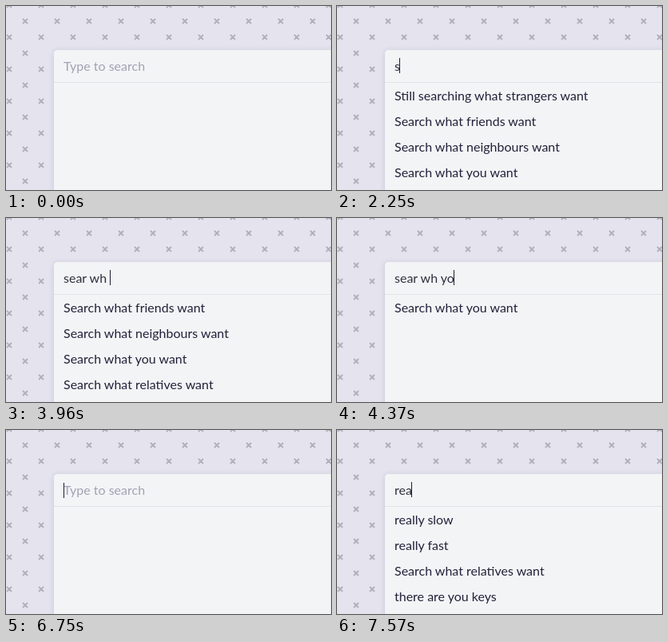
These frames come from a looping animation (407 by 230 pixels, 8000 ms). An HTML page:

```html
<!DOCTYPE html>
<html lang="en">
<head>
<meta charset="utf-8">
<title>Search box</title>
<style>
  html, body { margin: 0; width: 100%; height: 100%; overflow: hidden; }
  body { position: relative; background: #e5e3ee; font: 16px/19px Lato, sans-serif; color: #22223a; }
  svg { position: absolute; inset: 0; width: 100%; height: 100%; }
  .panel {
    position: absolute; left: 60px; top: 55px; right: -20px; bottom: -20px;
    background: #f3f4f6; border-radius: 4px 0 0 0;
    box-shadow: 0 1px 7px rgba(45, 40, 80, .15);
  }
  .rule { position: absolute; left: 0; right: 0; top: 40px; height: 1px; background: #e3e4ea; }
  .line { position: absolute; left: 12px; white-space: pre; }
  #field { top: 10px; color: #30303f; }
  #field.hint { color: #a2a2b6; }
  #field.selected { color: #a2a2b6; }
  #caret { position: absolute; width: 1px; height: 19px; background: #1d1d30; }
</style>
</head>
<body>
<svg aria-hidden="true">
  <defs>
    <pattern id="crosses" width="40" height="40" patternUnits="userSpaceOnUse">
      <path d="M21 16l6 6m0-6l-6 6M1 36l6 6m0-6l-6 6M1-4l6 6m0-6l-6 6" fill="none" stroke="#b2afbc" stroke-width="1.9"/>
    </pattern>
  </defs>
  <rect width="100%" height="100%" fill="url(#crosses)"/>
</svg>
<div class="panel">
  <div id="field" class="line"></div>
  <div id="caret"></div>
  <div class="rule"></div>
  <div id="results"></div>
</div>
<script>
const LOOP = 8000;
const $ = id => document.getElementById(id);
const field = $('field'), caret = $('caret'), results = $('results');

const want = who => `Search what ${who} want`;
const lists = {
  none: [],
  first: ['Still searching what strangers want', ...['friends', 'neighbours', 'you'].map(want)],
  search: ['friends', 'neighbours', 'you', 'relatives'].map(want),
  you: [want('you')],
  real: ['really slow', 'really fast', want('relatives'), 'there are you keys']
};

// [start ms, typed text, caret: 0 off / 1 on / 2 text selected, result list]
const steps = [
  [0, '', 0, 'none'],
  [850, '', 1, 'none'],
  [1370, '', 0, 'none'],
  [1910, '', 1, 'none'],
  [2250, 's', 1, 'first'],
  [2380, 'se', 1, 'search'],
  [2580, 'sea', 1, 'search'],
  [2740, 'sear', 1, 'search'],
  [3220, 'sear ', 1, 'search'],
  [3480, 'sear w', 1, 'search'],
  [3590, 'sear wh', 1, 'search'],
  [3960, 'sear wh ', 1, 'search'],
  [4170, 'sear wh y', 1, 'you'],
  [4370, 'sear wh yo', 1, 'you'],
  [4550, 'sear wh you', 1, 'you'],
  [5070, 'sear wh you', 0, 'you'],
  [5610, 'sear wh you', 1, 'you'],
  [6130, 'sear wh you', 0, 'you'],
  [6280, 'sear wh you', 2, 'you'],
  [6750, '', 1, 'none'],
  [7290, '', 0, 'none'],
  [7380, 'r', 1, 'real'],
  [7480, 're', 1, 'real'],
  [7570, 'rea', 1, 'real']
];

function show([, text, mode, list]) {
  field.textContent = text || 'Type to search';
  field.className = 'line' + (text ? '' : ' hint') + (mode === 2 ? ' selected' : '');
  const width = text ? field.getBoundingClientRect().width : 0;
  caret.style.left = 12 + Math.floor(width) + 'px';
  caret.style.top = (text ? 10 : 11) + 'px';
  caret.style.visibility = mode === 1 ? 'visible' : 'hidden';
  results.replaceChildren(...lists[list].map((label, i) => {
    const row = document.createElement('div');
    row.className = 'line';
    row.style.top = 47 + 32 * i + 'px';
    row.textContent = label;
    return row;
  }));
}

let current;
const start = performance.now();
function tick(now) {
  const t = Math.max(0, now - start) % LOOP;
  const step = steps.findLast(s => s[0] <= t);
  if (step !== current) show(current = step);
  requestAnimationFrame(tick);
}
tick(start);
</script>
</body>
</html>
```
